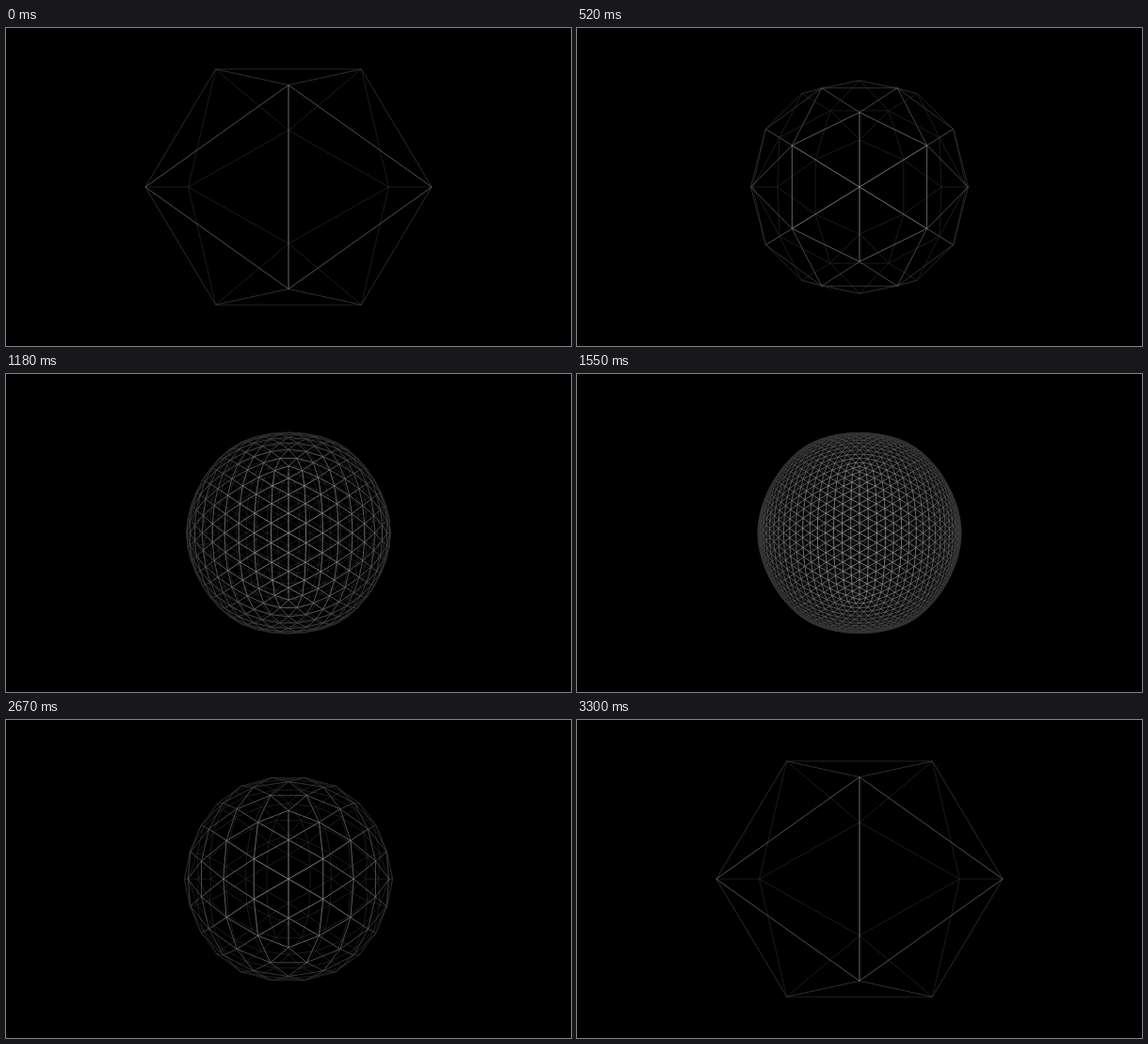
An HTML page with a canvas that plays this animation: 600 px wide and 338 px high, repeating every 4.27 s.

```html
<!DOCTYPE html>
<html lang="en">
<head>
<meta charset="utf-8">
<title>Wireframe subdivision</title>
<style>
  html, body { margin: 0; width: 100%; height: 100%; overflow: hidden; background: #000; }
  canvas { display: block; width: 600px; height: 338px; }
</style>
</head>
<body>
<canvas id="stage" width="600" height="338"></canvas>
<script>
const W = 600, H = 338, LOOP = 4270;
const FOCAL = 438, CAMERA = [0, 0, 5.66];
const LINE = 0.7, AMBIENT = 40, LAMP = 60;
const PHI = (1 + Math.sqrt(5)) / 2;

// Start time in ms and subdivision level of each step
const STEPS = [[0, 0], [520, 1], [850, 2], [1180, 3], [1550, 4],
               [2390, 3], [2670, 2], [3000, 1], [3300, 0]];

const sub = (a, b) => a.map((v, i) => v - b[i]);
const dot = (a, b) => a.reduce((s, v, i) => s + v * b[i], 0);
const cross = (a, b) => [a[1] * b[2] - a[2] * b[1], a[2] * b[0] - a[0] * b[2], a[0] * b[1] - a[1] * b[0]];
const blend = (...terms) => [0, 1, 2].map(i => terms.reduce((s, [w, p]) => s + w * p[i], 0));

function icosahedron() {
  const verts = [], faces = [];
  for (const s of [-1, 1]) for (const t of [-PHI, PHI])
    verts.push([0, s, t], [s, t, 0], [t, 0, s]);
  const linked = (i, j) => {
    const d = sub(verts[i], verts[j]);
    return dot(d, d) < 4.1;
  };
  for (let a = 0; a < 12; a++)
    for (let b = a + 1; b < 12; b++)
      for (let c = b + 1; c < 12; c++)
        if (linked(a, b) && linked(b, c) && linked(a, c)) faces.push([a, b, c]);
  return { verts, faces };
}

// Every edge with its two end vertices and the faces beside it
function edgeMap({ faces }) {
  const edges = new Map();
  for (const face of faces)
    face.forEach((p, i) => {
      const q = face[(i + 1) % 3];
      const a = Math.min(p, q), b = Math.max(p, q), key = a + "," + b;
      if (!edges.has(key)) edges.set(key, { a, b, opposite: [], faces: [] });
      const edge = edges.get(key);
      edge.opposite.push(face[(i + 2) % 3]);
      edge.faces.push(face);
    });
  return edges;
}

// One step of Loop subdivision
function subdivide(mesh) {
  const old = mesh.verts, edges = edgeMap(mesh);
  const around = old.map(() => []);
  for (const { a, b } of edges.values()) {
    around[a].push(b);
    around[b].push(a);
  }
  const verts = old.map((p, i) => {
    const w = 3 / (8 * around[i].length);
    return blend([5 / 8, p], ...around[i].map(j => [w, old[j]]));
  });
  for (const e of edges.values()) {
    e.mid = verts.length;
    verts.push(blend([3 / 8, old[e.a]], [3 / 8, old[e.b]],
                     [1 / 8, old[e.opposite[0]]], [1 / 8, old[e.opposite[1]]]));
  }
  const mid = (p, q) => edges.get(Math.min(p, q) + "," + Math.max(p, q)).mid;
  const faces = mesh.faces.flatMap(([a, b, c]) => {
    const ab = mid(a, b), bc = mid(b, c), ca = mid(c, a);
    return [[a, ab, ca], [b, bc, ab], [c, ca, bc], [ab, bc, ca]];
  });
  return { verts, faces };
}

// Light falling on a face from a lamp at the camera
function light(verts, face) {
  const [a, b, c] = face.map(i => verts[i]);
  const n = cross(sub(b, a), sub(c, a));
  const center = blend([1 / 3, a], [1 / 3, b], [1 / 3, c]);
  const ray = sub(CAMERA, center);
  const outward = Math.sign(dot(n, center));
  return Math.max(0, outward * dot(n, ray) / Math.sqrt(dot(n, n) * dot(ray, ray)));
}

function project([x, y, z]) {
  const k = FOCAL / (CAMERA[2] - z);
  return [W / 2 + x * k, H / 2 - y * k];
}

function render(mesh) {
  const layer = document.createElement("canvas");
  layer.width = W;
  layer.height = H;
  const g = layer.getContext("2d");
  g.fillRect(0, 0, W, H);
  g.lineWidth = LINE;
  const { verts } = mesh, points = verts.map(project);
  const depth = e => verts[e.a][2] + verts[e.b][2];
  const edges = [...edgeMap(mesh).values()].sort((p, q) => depth(p) - depth(q));
  for (const { a, b, faces } of edges) {
    const lit = faces.reduce((s, f) => s + light(verts, f), 0);
    const tone = AMBIENT + LAMP * lit;
    g.strokeStyle = `rgb(${tone}, ${tone}, ${tone})`;
    g.beginPath();
    g.moveTo(...points[a]);
    g.lineTo(...points[b]);
    g.stroke();
  }
  return layer;
}

const layers = [];
for (let level = 0, mesh = icosahedron(); level < 5; level++) {
  layers.push(render(mesh));
  if (level < 4) mesh = subdivide(mesh);
}

const ctx = document.getElementById("stage").getContext("2d");
const start = performance.now();
function draw() {
  const t = Math.max(0, performance.now() - start) % LOOP;
  const level = STEPS.filter(([from]) => from <= t).pop()[1];
  ctx.drawImage(layers[level], 0, 0);
  requestAnimationFrame(draw);
}
draw();
</script>
</body>
</html>
```
